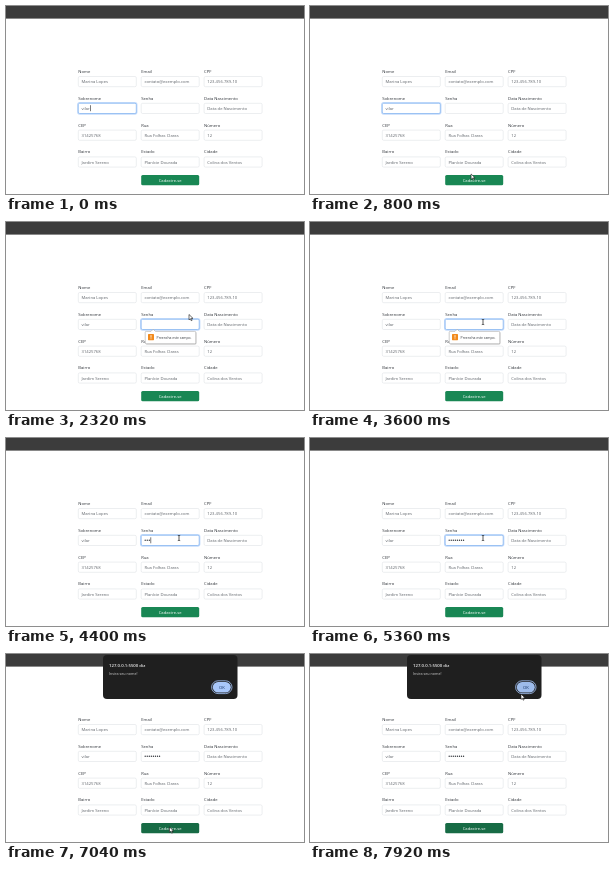
An HTML page that plays this animation: 298 by 188 pixels, repeating every 8000 ms.

```html
<!DOCTYPE html>
<html lang="pt-BR">
<head>
<meta charset="utf-8">
<style>
html, body { margin: 0; width: 100%; height: 100%; overflow: hidden; background: #fff; }
svg { display: block; width: 100vw; height: 100vh; }
text { font: 4.2px "Open Sans", "Noto Sans", sans-serif; fill: #30343a; white-space: pre; }
.value { fill: #60656b; }
.box { fill: #fff; stroke: #d8dce0; stroke-width: .5; }
.ring { fill: none; stroke: #c5dcfb; stroke-width: 1.2; }
.focus .box { stroke: #78acf0; stroke-width: .7; }
.field:not(.focus) .ring { display: none; }
.mid { text-anchor: middle; }
</style>
</head>
<body>
<svg viewBox="0 0 298 188">
  <rect width="298" height="12.6" fill="#3c3c3c"/>
  <g id="form"></g>
  <g id="dots" fill="#30343a"></g>
  <rect id="caret" width=".6" height="6" fill="#222"/>
  <rect id="button" x="135.2" y="169" width="58" height="10.2" rx="1.5"/>
  <text class="mid" x="164.2" y="175.6" style="fill:#fff">Cadastre-se</text>

  <g id="tip">
    <rect x="139.8" y="110" width="50.6" height="12.6" rx="1" fill="#888" opacity=".45"/>
    <path d="M140.2 109.4H145l2.2-2.2 2.2 2.2H188.8q1 0 1 1v10.4q0 1-1 1H140.2q-1 0-1-1v-10.4q0-1 1-1z" fill="#fff" stroke="#999" stroke-width=".5"/>
    <rect x="142" y="112" width="6" height="6.2" rx=".6" fill="#f28a1c"/>
    <path d="M145 113.1v2.6M145 116.4v.8" stroke="#fff" stroke-width=".8"/>
    <text x="150.6" y="116.8" style="font-size:3.4px">Preencha este campo.</text>
  </g>

  <g id="dialog">
    <rect x="97" y="1" width="134.5" height="44" rx="4" fill="#1f1f1f"/>
    <text x="103" y="12.9" style="font-size:4.3px;font-weight:600;fill:#f0f0f0">127.0.0.1:5500 diz</text>
    <text x="103" y="21" style="font-size:3.7px;fill:#d4d4d4">Insira seu nome!</text>
    <rect x="205.6" y="26.8" width="20.4" height="12.8" rx="6.4" fill="none" stroke="#a8c7fa" stroke-width=".8"/>
    <rect id="ok" x="206.8" y="28" width="18" height="10.4" rx="5.2"/>
    <text class="mid" x="215.8" y="34.8" style="fill:#173568">OK</text>
  </g>

  <g id="cursor">
    <path id="arrow" d="M0 0v5.4l1.3-1.2.9 2 .9-.4-.9-1.9h1.8z" fill="#fff" stroke="#111" stroke-width=".6"/>
    <path id="beam" d="M-1.2-2.6Q0-2.6 0-2Q0-2.6 1.2-2.6M0-2v4M-1.2 2.6Q0 2.6 0 2Q0 2.6 1.2 2.6" fill="none" stroke="#111" stroke-width=".7"/>
    <path id="hand" d="M-.6.4Q0-.4.6.4v2l2.2.5q.8.2.7 1L3 6.6H-.3L-2.2 4q-.2-.8.6-.7l1 .7z" fill="#fff" stroke="#111" stroke-width=".5"/>
  </g>
</svg>
<script>
const $ = id => document.getElementById(id);
const LOOP = 8000, STEP = 80;
const fields = [
  ['Nome', 'Marina Lopes'], ['Email', 'contato@exemplo.com'], ['CPF', '123.456.789-10'],
  ['Sobrenome', 'vilar'], ['Senha', ''], ['Data Nascimento', 'Data de Nascimento'],
  ['CEP', '31425768'], ['Rua', 'Rua Folhas Claras'], ['Número', '12'],
  ['Bairro', 'Jardim Sereno'], ['Estado', 'Planície Dourada'], ['Cidade', 'Colina dos Ventos']
];

$('form').innerHTML = fields.map(([label, value], i) => {
  const x = 72.3 + i % 3 * 62.9, y = 70.5 + Math.floor(i / 3) * 26.8;
  return `<g class="field"><text x="${x}" y="${y - 3.6}">${label}</text>
    <rect class="ring" x="${x - .6}" y="${y - .6}" width="59.2" height="11.4" rx="2"/>
    <rect class="box" x="${x}" y="${y}" width="58" height="10.2" rx="1.4"/>
    <text class="value" x="${x + 3.2}" y="${y + 6.6}">${value}</text></g>`;
}).join('');
$('dots').innerHTML = Array.from({ length: 8 }, (_, i) =>
  `<circle cx="${139.2 + i * 2.05}" cy="102.3" r=".68"/>`).join('');

const boxes = document.querySelectorAll('.field');
const surname = boxes[3], password = boxes[4];

// Pointer stops: time, x, y
const path = [
  [400, 112, 105], [880, 165, 173], [1900, 165.5, 173], [2240, 183, 92.5],
  [2400, 183, 92.5], [2720, 173, 100], [5840, 173, 100], [6240, 163.5, 173],
  [7120, 163.5, 173], [7760, 211, 40], [8000, 211, 40]
];

function pointer(t) {
  const i = path.findIndex(p => p[0] > t);
  if (i < 1) return path[0].slice(1);
  const [t0, x0, y0] = path[i - 1], [t1, x1, y1] = path[i];
  const u = (t - t0) / (t1 - t0), k = u * u * (3 - 2 * u);
  return [x0 + (x1 - x0) * k, y0 + (y1 - y0) * k];
}

const show = (id, on) => $(id).style.display = on ? '' : 'none';
const inside = (x, y, l, t, w, h) => x >= l && x <= l + w && y >= t && y <= t + h;

function draw(now) {
  const t = Math.floor(now % LOOP / STEP) * STEP;
  const [x, y] = pointer(t);
  const modal = t >= 6880;
  const onSurname = t < 1200, onPassword = t >= 1520 && t < 6560;
  const typed = Math.max(0, Math.min(8, Math.floor((t - 3840) / 160)));

  surname.classList.toggle('focus', onSurname);
  password.classList.toggle('focus', onPassword);
  [...$('dots').children].forEach((dot, i) => dot.style.display = i < typed ? '' : 'none');

  const typing = t >= 3920 && t < 5120;
  const blink = onSurname ? t % 1060 < 530 : typing || (t - 5120 + 10600) % 1060 < 240 || t > 6200;
  const textWidth = surname.querySelector('.value').getComputedTextLength();
  $('caret').setAttribute('x', onSurname ? 75.8 + textWidth : 138.4 + typed * 2.05);
  $('caret').setAttribute('y', onSurname ? 99.2 : 99.3);
  show('caret', (onSurname || onPassword) && blink);

  const hover = modal || inside(x, y, 135, 169, 58, 10.2);
  $('button').setAttribute('fill', hover ? '#176b45' : '#198754');
  show('tip', t >= 1600 && t < 3920);
  show('dialog', modal);
  const onOk = modal && inside(x, y, 205, 27, 21, 14);
  $('ok').setAttribute('fill', onOk ? '#9dbbea' : '#a8c7fa');

  const hand = hover && !modal;
  const beam = !modal && (inside(x, y, 72, 97, 58, 10.5) || inside(x, y, 135, 97, 58, 10.5));
  show('cursor', t >= 400);
  show('hand', hand);
  show('beam', beam);
  show('arrow', !hand && !beam);
  $('cursor').setAttribute('transform', `translate(${x} ${y})`);
}

const start = performance.now();
(function frame() {
  draw(performance.now() - start);
  requestAnimationFrame(frame);
})();
</script>
</body>
</html>
```
